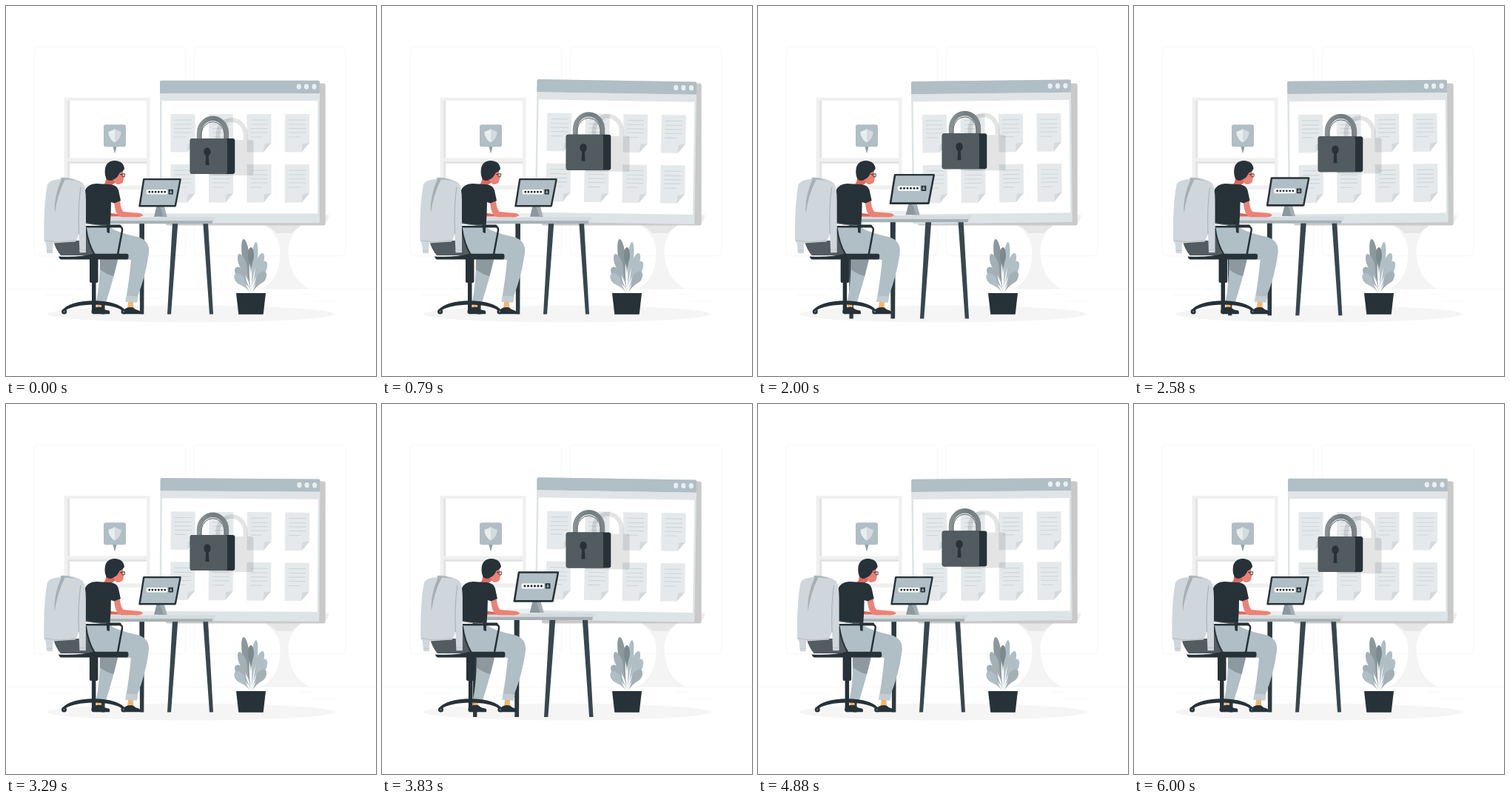
Recreate the animation shown at these times as an HTML page. Size 500x500 px, loop 6.04 s.

```html
<!DOCTYPE html>
<html lang="en">
<head>
<meta charset="utf-8">
<title>Secure workspace</title>
<style>
  html, body { margin: 0; width: 100%; height: 100%; overflow: hidden; background: #fff; }
  svg { display: block; width: 100%; height: 100%; }
</style>
</head>
<body>
<svg viewBox="0 0 500 500">
  <defs>
    <linearGradient id="steel" x1="0" x2="1">
      <stop offset="0" stop-color="#8a9193"/>
      <stop offset=".55" stop-color="#727c80"/>
      <stop offset="1" stop-color="#7d8588"/>
    </linearGradient>
    <g id="doc">
      <path d="M0 0H33V39L22.5 51.5H0Z" fill="#e5e9eb"/>
      <path d="M33 39L22.5 51.5L23.5 40.5Z" fill="#d3d9dc"/>
      <path d="M5 8H28M5 14H28M5 19.5H28M5 25H28M5 31H21" stroke="#cfd5d8" stroke-width="1.1"/>
    </g>
  </defs>

  <!-- room -->
  <g fill="none" stroke="#ebebeb" stroke-width=".4">
    <rect x="38.3" y="55" width="204.4" height="282.7" rx="5.7"/>
    <rect x="254.6" y="55" width="204.4" height="282.7" rx="5.7"/>
    <path d="M0 382.5H500M416.8 398.6H450M322.5 401.3H331M396.6 389.3H416M52.5 391H95.6M104.6 391H111M131.5 395.2H225"/>
  </g>
  <ellipse cx="250" cy="416.2" rx="193.9" ry="11.3" fill="#f5f5f5"/>

  <!-- shelf -->
  <path fill="#f0f0f0" fill-rule="evenodd" d="M78.5 124H194.5V248H78.5ZM86 128V205.5H190V128ZM86 213V242.5H190V213Z"/>
  <path fill="#e4e4e4" d="M83 128H86.3V205H83ZM83 210.3H190V213H86.3V243H83Z"/>

  <!-- speech bubble -->
  <path d="M143.8 188H150.2L147 199.5Z" fill="#90a0a8"/>
  <rect x="132" y="160.3" width="30" height="30" rx="3" fill="#b0bec5"/>
  <path d="M147 166Q142 169.3 138.5 169.5Q138 179 147 184.5Z" fill="#e8edef"/>
  <path d="M147 166Q152 169.3 155.5 169.5Q156 179 147 184.5Z" fill="#d3dbdf"/>

  <!-- stand and backing plate -->
  <path d="M345 293H402Q383 309 381.5 328Q381 368 410 382H344Q372 370 370.5 328Q369 308 345 293Z" fill="#f4f4f4"/>
  <path d="M349 295H401Q391 302 386 307H366Q360 301 349 295Z" fill="#e6e6e6"/>
  <path d="M428 282.5H437L433.5 292H428Z" fill="#efefef"/>
  <rect x="216" y="104.5" width="215.7" height="192" rx="2.5" fill="#c9c9c9"/>

  <g id="screen">
    <rect x="208" y="100.8" width="215.8" height="192.4" rx="2" fill="#dde4e7"/>
    <path d="M208 118V102.8Q208 100.8 210 100.8H421.8Q423.8 100.8 423.8 102.8V118Z" fill="#b0bec5"/>
    <rect x="208" y="118" width="215.8" height="10" fill="#e0e4e6"/>
    <rect x="210.5" y="128" width="210.8" height="152.4" fill="#fff"/>
    <g fill="#e9eff1">
      <ellipse cx="395.8" cy="109" rx="3.1" ry="3.7"/>
      <ellipse cx="406" cy="109" rx="3.1" ry="3.7"/>
      <ellipse cx="416.5" cy="109" rx="3.1" ry="3.7"/>
    </g>
    <g id="docs"></g>
  </g>

  <g id="lock">
    <g opacity=".1">
      <path d="M286.5 181V174A18.5 20 0 0 1 323.5 174V181" fill="none" stroke="#000" stroke-width="6"/>
      <rect x="274" y="181" width="60.5" height="48" rx="3"/>
    </g>
    <path d="M261 179.5V172A18.5 20.3 0 0 1 298 172V179.5" fill="none" stroke="url(#steel)" stroke-width="6.4"/>
    <path d="M264 179V172A15.6 17.4 0 0 1 295 172V179" fill="none" stroke="#5d676b" stroke-width="1"/>
    <rect x="248.7" y="179" width="60.6" height="48" rx="3" fill="#263238"/>
    <path d="M251.7 179H296Q299 179 299 182V224Q299 227 296 227H251.7Q248.7 227 248.7 224V182Q248.7 179 251.7 179Z" fill="#525b60"/>
    <ellipse cx="272" cy="197" rx="4.7" ry="5.8" fill="#263238"/>
    <path d="M270.3 200H273.7L274.5 215H269.5Z" fill="#263238"/>
  </g>

  <!-- plant -->
  <g id="plant" stroke-linecap="round"></g>
  <path d="M311 388H351L347.7 416.7H314.3Z" fill="#263238"/>

  <g id="desk">
    <g fill="#37474f">
      <path d="M225 293H232.3L223 416.5H218Z"/>
      <path d="M266.3 293H273L280 416.5H275Z"/>
      <path d="M180.3 293H187L186.3 416.5H181Z" fill="#2c3a41"/>
      <path d="M128 293H134.5L133.5 416.5H128.5Z" fill="#2c3a41"/>
    </g>
    <path d="M124 289H280L278.5 294.3H124Z" fill="#a7b2b7"/>
    <path d="M124 285.3H283.5L281.5 290.3H124Z" fill="#d5dbde"/>
    <path d="M165 284.5L172 280H205L203 285Z" fill="#eceff1"/>
    <path d="M203.5 270.5H213.5L217.5 284.8H200Z" fill="#8b989e"/>
    <path d="M208 270.5H213.5L217.5 284.8H213Z" fill="#a3afb5"/>
    <path d="M186.5 233H235.5Q237 233 236.8 234.5L230 270.3Q229.7 271.6 228.4 271.6H180.3Q179 271.6 179.3 270.2L185 234.2Q185.2 233 186.5 233Z" fill="#263238"/>
    <path d="M187.3 235.3H234.3L227.8 269H182Z" fill="#b0bec5"/>
    <rect x="189.6" y="248" width="28.6" height="6.5" rx="1.6" fill="#fff"/>
    <path d="M193.7 251.2H216" stroke="#263238" stroke-width="2.9" stroke-linecap="round" stroke-dasharray="0 4.2"/>
    <rect x="219.5" y="247.8" width="6.4" height="6.8" rx=".8" fill="#263238"/>
    <path d="M221.2 250.8H224.2V253H221.2ZM221.8 250.8V249.8A.9 .9 0 0 1 223.6 249.8V250.8" fill="#8f9ca3"/>
  </g>

  <g id="man">
    <!-- far leg -->
    <path d="M122.5 399H129V409H122.5Z" fill="#f5b469"/>
    <path d="M118 409Q122 406 129 407Q133 411 139 411.5Q141 413 140 416.3H118Z" fill="#263238"/>
    <path d="M127 340H152Q146 366 134.5 402.5L121.5 401.5Q127 378 127 340Z" fill="#b0bec5"/>
    <path d="M127 342H151L145.5 365Q136 363 127 356Z" fill="#8d999f"/>
    <!-- near leg -->
    <path d="M165.5 398H172V409H164Z" fill="#f5b469"/>
    <path d="M161 409Q166 406 172 407.5Q175 411 180 411.8Q182 413 181 416.3H160Z" fill="#263238"/>
    <path d="M106 297L141 299Q150 306 178 312Q195 317 193 334Q189 364 178 392L177 400.5L161.5 399.5Q167 368 169 343L107 340Z" fill="#b0bec5"/>
    <path d="M163 391.5L178.5 392.5L177 400.5L161.5 399.5Z" fill="#c3ced3"/>
    <!-- arms and head -->
    <path d="M138 279.5L150 281L155 284.5H138Z" fill="#d9685e"/>
    <path d="M146 262L154 261Q154 272 158.5 278L175 279.5Q184 279.5 185.3 283Q182 285.8 174 285.3L156 285.2Q147 284 146 262Z" fill="#ed8175"/>
    <path d="M135 230H148L147 239L143 242H131Q136 239 135 230Z" fill="#d9685e"/>
    <path d="M144 226L157.5 221L159.3 231.5L158 238Q155 241.5 150 241Q145 239 144 226Z" fill="#ed8175"/>
    <path d="M154 227.5L160.5 226.7V230.5Q157 232 156 228" fill="none" stroke="#263238" stroke-width=".9"/>
    <path d="M133.7 222Q134.5 209.5 147 209Q159 209.5 160 220Q158 224 153.5 225.5Q151 232 146 234Q141 237.5 136.5 234.5Q133 229 133.7 222Z" fill="#263238"/>
    <path d="M106.5 250Q110 240.5 122 240L142 241.3Q150 242.5 152 249L155 263L146.5 266.5L142 265Q142 281 140.5 298L106 294Z" fill="#263238"/>
    <path d="M107 293Q122 297 140 296.2" fill="none" stroke="#7d898f" stroke-width=".9"/>
    <!-- chair -->
    <path d="M64 317H104L108 301Q111 324 120 337H74Q67 329 64 317Z" fill="#525c61"/>
    <path d="M108 300Q111 322 120 336" fill="none" stroke="#263238" stroke-width="2"/>
    <path d="M108 298.3H153Q158 298.5 157 303.5L151 336" fill="none" stroke="#263238" stroke-width="2.5"/>
    <path d="M137 297.3H154" stroke="#263238" stroke-width="3.4" stroke-linecap="round"/>
    <path d="M136 298H140V307L136.5 306Z" fill="#263238"/>
    <path d="M71 338.5Q100 340 118 334.8H163.5Q165.5 335 165.5 337V340.5Q165.3 342.5 163 342.5H74Q72 342 71 338.5Z" fill="#263238"/>
    <path d="M113 342H124.5V372Q124.5 374 122.5 374H115Q113 374 113 372ZM116 373H121.5V412H116Z" fill="#263238"/>
    <path d="M76 411Q86 399 118.7 398.3Q151 399 161 411L156 411Q146 404 118.7 403.5Q92 404 81 411Z" fill="#263238"/>
    <g fill="#263238">
      <circle cx="78.6" cy="413" r="3.5"/><circle cx="159" cy="413" r="3.5"/>
      <circle cx="118.7" cy="413" r="3.2"/>
    </g>
    <g fill="#65727a"><circle cx="78.6" cy="413" r="1.2"/><circle cx="159" cy="413" r="1.2"/></g>
    <!-- jacket -->
    <path d="M56 241Q60 234.5 73 234L76 231.5Q95 232 104 239.5Q108 247 108 262V333.3H99.5L98.5 308L94 318.5L63.5 320.5L63 334.3H55.3L54 321L51.5 317Q50.5 270 56 241Z" fill="#cfd6dc"/>
    <path d="M76 232Q64 258 66 280Q69 256 80 234Z" fill="#a5afb4"/>
    <path d="M74 232L84 232.5L104 239.5Q92 234 74 234.5Z" fill="#aab4b9"/>
    <path d="M101 245Q97 270 98.5 308" fill="none" stroke="#a5afb4" stroke-width="1"/>
    <path d="M52 316.5Q74 321 94 316.5" fill="none" stroke="#b1bbc1" stroke-width=".9"/>
    <path d="M99.5 329.5H108M55 330.5H63" stroke="#b9c3c8" stroke-width=".8"/>
  </g>
</svg>
<script>
  const LOOP = 6040, FPS = 24, LAST = 6000;
  const $ = id => document.getElementById(id);

  $('docs').innerHTML = [146, 214].map(y =>
    [222.5, 274, 325.5, 377].map(x => `<use href="#doc" x="${x}" y="${y}"/>`).join('')).join('');

  // base x, base y, tip x, tip y, half width, colour
  const LEAVES = [
    [331, 388, 338, 319, 4, '#b0bec5'],
    [331, 388, 321, 315, 5, '#8c989e'],
    [331, 365, 331, 326, 4, '#7c898f'],
    [331, 380, 315, 335, 5, '#a3b0b6'],
    [332, 380, 347, 334, 5, '#b0bec5'],
    [331, 384, 311, 353, 6, '#a3b0b6'],
    [332, 384, 351, 345, 6, '#b0bec5'],
    [331, 388, 310, 362, 6, '#b0bec5'],
    [332, 388, 350, 359, 6, '#a3b0b6']
  ];
  $('plant').innerHTML = LEAVES.map(([x, y, tx, ty, w, fill]) => {
    const dx = tx - x, dy = ty - y, len = Math.hypot(dx, dy);
    const nx = -dy / len * w, ny = dx / len * w;
    const at = (k, s) => `${x + dx * k + nx * s} ${y + dy * k + ny * s}`;
    return `<path fill="${fill}" d="M${x} ${y}C${at(.5, .1)} ${at(.55, 1.1)} ${at(.75, 1)}
      C${at(.9, .9)} ${at(1, .5)} ${tx} ${ty}C${at(1, -.5)} ${at(.9, -.9)} ${at(.75, -1)}
      C${at(.55, -1.1)} ${at(.5, -.1)} ${x} ${y}Z"/>`;
  }).join('');

  // tracks of [time in ms, value], linear between steps
  const FLOAT = [[0, 0], [1500, -10], [3000, 0]];
  const WIND = [[0, 0], [750, 1], [2250, -1], [3000, 0]];
  const BEAT = [[0, 1], [1000, 1], [1600, 1.1], [2800, 1], [3400, 1], [4000, 1.1], [4600, 1], [6000, 1]];
  const SHAKE = [0, -1, 2, -4, 4, -4, 4, -4, 2, -1, 0].map((x, i) => [i * 600, x]);

  function sample(track, t) {
    const i = Math.max(1, track.findIndex(step => step[0] >= t));
    const [t0, a] = track[i - 1], [t1, b] = track[i];
    return a + (b - a) * (t - t0) / (t1 - t0);
  }

  const move = (id, value) => $(id).setAttribute('transform', value);
  const start = performance.now();

  function draw() {
    const now = (performance.now() - start) % LOOP;
    const t = Math.min(LAST, Math.floor((now + 5) * FPS / 1000) * 1000 / FPS);
    move('lock', `translate(0 ${sample(FLOAT, t % 3000)})`);
    move('screen', `rotate(${sample(WIND, t % 3000)} 316 197)`);
    move('desk', `translate(204 324.8) scale(${sample(BEAT, t)}) translate(-204 -324.8)`);
    move('man', `translate(${sample(SHAKE, t)} 0)`);
    requestAnimationFrame(draw);
  }
  draw();
</script>
</body>
</html>
```
